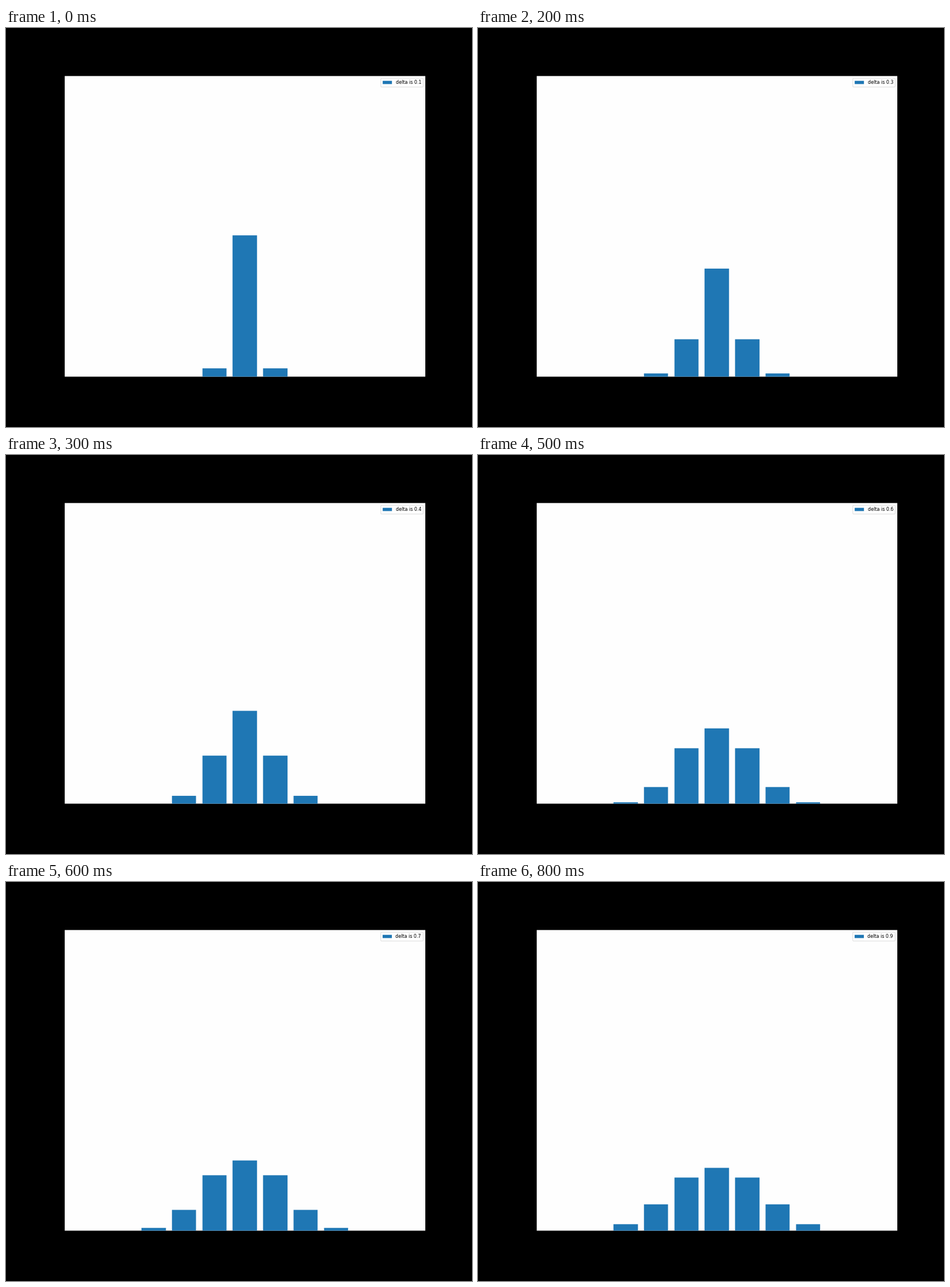
Write a matplotlib script that moves like this. It is 808 by 693 pixels and loops after 0.9 s.

```python
import matplotlib.pyplot as plt
import numpy as np
from matplotlib.animation import FuncAnimation
from matplotlib.patches import Rectangle

W, H, DPI = 808, 693, 72
GRID_W, GRID_H = 1008, 864      # drawing units, scaled down to the stage
SCALE = W / GRID_W
FONT = 10 * SCALE
BLUE = "#1f77b4"

# Plot area in drawing units, inside a one-unit black frame
LEFT, RIGHT = 0.125 * GRID_W, 0.9 * GRID_W
BOTTOM, TOP = 0.125 * GRID_H, 0.88 * GRID_H
STEP = (RIGHT - LEFT) / 11.88
BASE = BOTTOM + 1
FRAMES = 9
REACH = 3

plt.rcParams["font.family"] = "DejaVu Sans"
fig = plt.figure(figsize=(W / DPI, H / DPI), dpi=DPI, facecolor="black")
ax = fig.add_axes([0, 0, 1, 1])
ax.set_xlim(0, GRID_W)
ax.set_ylim(0, GRID_H)
ax.axis("off")


def box(x0, x1, y0, y1, color, **kw):
    rect = Rectangle((x0, y0), x1 - x0, y1 - y0, facecolor=color,
                     linewidth=0, snap=False, **kw)
    return ax.add_patch(rect)


def edge(pos):
    return round((LEFT + RIGHT) / 2 + pos * STEP)


def heights(delta):
    """Bell shape over distance; it widens and flattens as delta grows."""
    dist = np.arange(REACH + 1)
    steep = np.exp(0.298 - 2.38 * np.tanh((delta - 0.25) / 0.48))
    t = min(delta / 0.72, 1)
    power = 1.25 + 1.11 * t * t * (3 - 2 * t)
    weight = np.exp(-steep * dist ** power)
    return 0.5 * weight / weight.sum()


box(LEFT + 1, int(RIGHT), BASE, int(TOP), "#fefefe")
offsets = range(-REACH, REACH + 1)
bars = [box(edge(k - 0.4), edge(k + 0.4), BASE, BASE, BLUE) for k in offsets]

key = Rectangle((0, 0), 1, 1, facecolor=BLUE, linewidth=0)
legend = ax.legend([key], ["delta is 0.1"], loc="upper right", fontsize=FONT,
                   bbox_to_anchor=(RIGHT, TOP), bbox_transform=ax.transData)
legend.get_frame().set(linewidth=SCALE, snap=False)
legend.get_patches()[0].set_snap(False)
label = legend.get_texts()[0]


def draw(i):
    delta = (i + 1) / 10
    h = heights(delta)
    for k, bar in zip(offsets, bars):
        top = round(BOTTOM + (TOP - BOTTOM) * h[abs(k)])
        bar.set_height(max(top - BASE, 0))
    label.set_text(f"delta is {delta:.1f}")
    return [*bars, label]


anim = FuncAnimation(fig, draw, frames=FRAMES, interval=100,
                     repeat=True, repeat_delay=0)
plt.show()
```
